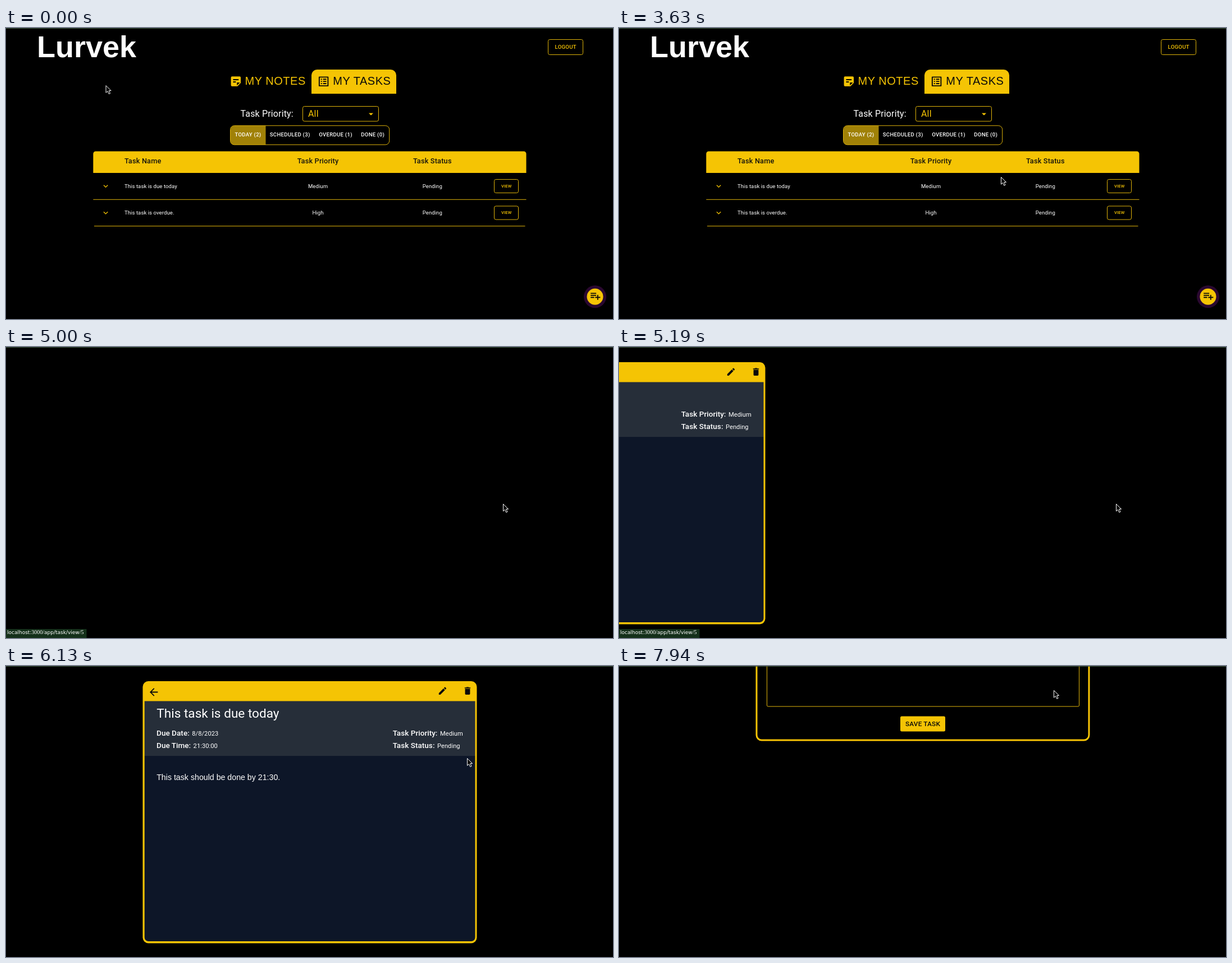
Animation, 1081 px wide and 518 px high, one loop 8000 ms. Source, as an HTML page:

```html
<!DOCTYPE html>
<html lang="en">
<head>
<meta charset="utf-8">
<title>Task list</title>
<style>
html, body { margin: 0; height: 100%; overflow: hidden; background: #000; }
svg { display: block; width: 100vw; height: 100vh; }
text { font-family: Roboto, sans-serif; fill: #fff; white-space: pre; }
.sans { font-family: "Liberation Sans", Arial, sans-serif; }
.gold { fill: #f5c404; }
.dark { fill: #0a0a0a; }
.line { fill: none; stroke: #dfb30a; }
.m { font-weight: 500; }
.c { text-anchor: middle; }
.tab { font-size: 20px; letter-spacing: .53px; }
.toggle { font-size: 9.6px; letter-spacing: .27px; }
.head { font-size: 12.8px; letter-spacing: .15px; fill: #17150c; }
.cell { font-size: 9.6px; letter-spacing: .05px; }
.view { font-size: 7.5px; letter-spacing: .2px; }
.label { font-size: 13.6px; font-weight: 500; }
.value { font-size: 11.2px; }
.url { font-family: "DejaVu Sans", sans-serif; font-size: 9px; }
.url tspan { font-family: "Liberation Serif", serif; font-size: 10px; }
</style>
</head>
<body>
<svg viewBox="0 0 1081 518">
  <g id="list"></g>
  <g id="card"></g>
  <g id="form"></g>
  <g id="status">
    <rect y="502" width="143.5" height="16" fill="#14301a"/>
    <text class="url" x="2" y="511">localhost<tspan>:3000/</tspan>app/task/view<tspan>/5</tspan></text>
  </g>
  <rect width="1081" height="1" fill="#3c563f"/>
  <g id="cursor" stroke="#fff" stroke-linejoin="round">
    <path id="arrow" d="M.5 .5V13.2L3.5 10.5 5.7 15.4 8 14.4 5.8 9.6H9.6Z"/>
    <path id="hand" stroke-width=".5" d="M2 1Q3.3 -.3 4.3 1V5.5L9 6.6Q10.2 7 10 8.5L9 12.5V15H3.2V12.8L-.8 8.6Q-.8 7 .6 7.4L2 8.6Z"/>
  </g>
</svg>
<script>
const $ = id => document.getElementById(id);

const text = (x, y, cls, s, extra = '') => `<text x="${x}" y="${y}" class="${cls}" ${extra}>${s}</text>`;
const rect = (x, y, w, h, r, attrs) => `<rect x="${x}" y="${y}" width="${w}" height="${h}" rx="${r}" ${attrs}/>`;
const icon = (name, x, y, scale, cls) =>
  `<path class="${cls}" fill-rule="evenodd" transform="translate(${x} ${y}) scale(${scale})" d="${icons[name]}"/>`;

const icons = {
  note: 'M19 3H5a2 2 0 0 0-2 2v14a2 2 0 0 0 2 2h10l6-6V5a2 2 0 0 0-2-2zM7 8h10v2H7zM12 14H7v-2h5zM14 19.5V14h5.5z',
  tasks: 'M4 3H20a1 1 0 0 1 1 1V20a1 1 0 0 1-1 1H4a1 1 0 0 1-1-1V4a1 1 0 0 1 1-1zM5 5V19H19V5zM11 7h6v2h-6zM11 11h6v2h-6zM11 15h6v2h-6zM7 7h2v2H7zM7 11h2v2H7zM7 15h2v2H7z',
  add: 'M14 10H3v2h11zM14 6H3v2h11zM18 14v-4h-2v4h-4v2h4v4h2v-4h4v-2zM3 16h7v-2H3z',
  chevron: 'M16.6 8.6 12 13.2 7.4 8.6 6 10l6 6 6-6z',
  back: 'M20 11H7.8l5.6-5.6L12 4l-8 8 8 8 1.4-1.4L7.8 13H20z',
  edit: 'M3 17.25V21h3.75L17.8 9.9l-3.75-3.75zM20.7 7a1 1 0 0 0 0-1.4l-2.3-2.3a1 1 0 0 0-1.4 0l-1.9 1.8 3.8 3.8z',
  bin: 'M6 19a2 2 0 0 0 2 2h8a2 2 0 0 0 2-2V7H6zM19 4h-3.5l-1-1h-5l-1 1H5v2h14z'
};

const row = (y, name, priority, id) =>
  icon('chevron', 169.4, y - 7.6, .68, 'gold') +
  text(211, y + 3.8, 'cell', name) +
  text(555.5, y + 3.8, 'cell c', priority) +
  text(759.3, y + 3.8, 'cell c', 'Pending') +
  rect(869.5, y - 11.5, 43, 24, 3, `class="line" id="${id}Box"`) +
  text(891.2, y + 2.8, 'view gold m c', 'VIEW', `id="${id}Text"`);

$('list').innerHTML =
  text(55, 52, 'sans', 'Lurvek', 'font-size="54" font-weight="700"') +
  rect(965.5, 20.5, 62, 27, 3, 'class="line"') +
  text(996.7, 37.4, 'toggle gold m c', 'LOGOUT') +
  icon('note', 397.7, 83.3, .97, 'gold') +
  text(425.5, 101, 'tab sans gold', 'MY NOTES') +
  '<path class="gold" d="M544 117V84a10 10 0 0 1 10-10H685a10 10 0 0 1 10 10V117z"/>' +
  icon('tasks', 554, 83.5, .97, 'dark') +
  text(582.3, 101, 'tab sans dark', 'MY TASKS') +
  text(417.5, 157.7, '', 'Task Priority:', 'font-size="16" letter-spacing=".15"') +
  rect(528.5, 139.5, 135, 26.5, 3, 'class="line"') +
  text(538, 157.7, 'gold', 'All', 'font-size="16" letter-spacing=".15"') +
  '<path class="gold" d="M646 151.5h8l-4 4z"/>' +
  '<path fill="#a08107" d="M462.5 174V208H407a7 7 0 0 1-7-7V181a7 7 0 0 1 7-7z"/>' +
  rect(399.5, 173.8, 283.2, 34, 7, 'class="line"') +
  [[431, 'TODAY (2)'], [505.7, 'SCHEDULED (3)'], [587, 'OVERDUE (1)'], [653.2, 'DONE (0)']]
    .map(([x, s]) => text(x, 193.4, 'toggle m c', s)).join('') +
  '<path class="gold" d="M155.3 258V224a4.5 4.5 0 0 1 4.5-4.5H922a4.5 4.5 0 0 1 4.5 4.5V258z"/>' +
  text(211, 241.3, 'head m', 'Task Name') +
  text(555.5, 241.3, 'head m c', 'Task Priority') +
  text(759.3, 241.3, 'head m c', 'Task Status') +
  row(281, 'This task is due today', 'Medium', 'first') +
  row(328.5, 'This task is overdue.', 'High', 'second') +
  '<path class="line" d="M155.3 305.3H926.5M157 352.6H924.5"/>' +
  '<circle cx="1049" cy="478.3" r="20" fill="#2a0830"/><circle class="gold" cx="1049" cy="478.3" r="14.5"/>' +
  icon('add', 1038.5, 466, .9, 'dark');

$('card').innerHTML =
  rect(243.5, 27, 595, 466.5, 10, 'class="gold"') +
  '<path fill="#0d1628" d="M246.7 160H835.5V483a7 7 0 0 1-7 7H253.7a7 7 0 0 1-7-7z"/>' +
  rect(246.7, 62.5, 588.8, 97.5, 0, 'fill="#262e39"') +
  icon('back', 252.4, 35.7, .9, 'dark') +
  icon('edit', 768.6, 35.4, .74, 'dark') +
  icon('bin', 813.1, 35.4, .74, 'dark') +
  text(268.3, 92, '', 'This task is due today', 'font-size="22.6"') +
  [[268, 124.3, 'Due Date:', 331.3, '8/8/2023'], [268, 145.8, 'Due Time:', 333.6, '21:30:00'],
   [688.7, 124.3, 'Task Priority:', 773, 'Medium'], [688.7, 145.8, 'Task Status:', 768, 'Pending']]
    .map(([x, y, s, vx, v]) => text(x, y, 'label', s) + text(vx, y, 'value', v)).join('') +
  text(268.2, 203, 'sans', 'This task should be done by 21:30.', 'font-size="14.2"');

$('form').innerHTML =
  rect(245, -330, 592, 462, 9, 'class="line" style="stroke:#fac505" stroke-width="3"') +
  rect(263.5, -150, 556, 222, 2, 'class="line"') +
  rect(501, 89.5, 80, 27, 2.5, 'class="gold"') +
  text(541, 107, 'dark m c', 'SAVE TASK', 'font-size="11.8" letter-spacing=".2"');

// Pointer stops: tick, x, y
const stops = [
  [14, 177.5, 102], [16, 163, 130], [18, 190, 190], [21, 285, 250], [25, 285, 250],
  [28, 228, 290], [32, 318.5, 349], [33, 318.5, 349], [35, 451, 340], [37, 330, 330],
  [38, 330, 330], [41, 221, 300], [45, 400, 285], [49, 584, 273], [57, 584, 273],
  [58, 680, 265], [60, 680, 265], [62, 820, 276], [65, 820, 276], [69, 885, 279],
  [93, 885, 279], [94, 872, 279], [97, 872, 279], [98, 821, 164], [103, 772, 74],
  [107, 772, 74], [110, 774, 32], [114, 774, 43]
];

const clamp = v => Math.max(0, Math.min(1, v));

function pointer(n) {
  const i = stops.findIndex(s => s[0] >= n);
  if (i < 1) return stops[i < 0 ? stops.length - 1 : 0].slice(1);
  const [a, b] = [stops[i - 1], stops[i]];
  const k = (n - a[0]) / (b[0] - a[0]);
  return [1, 2].map(j => a[j] + (b[j] - a[j]) * k);
}

const show = (el, opacity) => {
  el.style.display = opacity > 0 ? '' : 'none';
  el.style.opacity = opacity;
};

function draw(now) {
  const n = Math.floor((now % 8000 + 2.5) / 62.5);

  show($('list'), clamp((79 - n) / 4));
  show($('card'), n < 80 ? 0 : clamp((123 - n) / 3));
  show($('form'), n >= 124 ? 1 : 0);
  show($('status'), n < 72 || n > 84 ? 0 : clamp(.45 + (n - 72) * .4));

  $('card').setAttribute('transform', `translate(${n > 88 ? 0 : 99 * (n - 87) - 182})`);
  $('form').setAttribute('transform', `translate(0 ${47.5 * (n - 127)})`);

  const hover = clamp((n - 69) / 4);
  $('firstBox').style.fill = `rgba(245,196,4,${hover})`;
  $('firstText').style.fill = hover > .5 ? '#0a0a0a' : '#f5c404';

  const [x, y] = pointer(n);
  const hand = n >= 69 && n < 77 || n >= 110 && n < 121;
  $('cursor').setAttribute('transform', `translate(${x} ${y})`);
  show($('arrow'), hand ? 0 : 1);
  show($('hand'), hand ? 1 : 0);
}

const start = performance.now();
function loop() {
  draw(performance.now() - start);
  requestAnimationFrame(loop);
}
loop();
</script>
</body>
</html>
```
